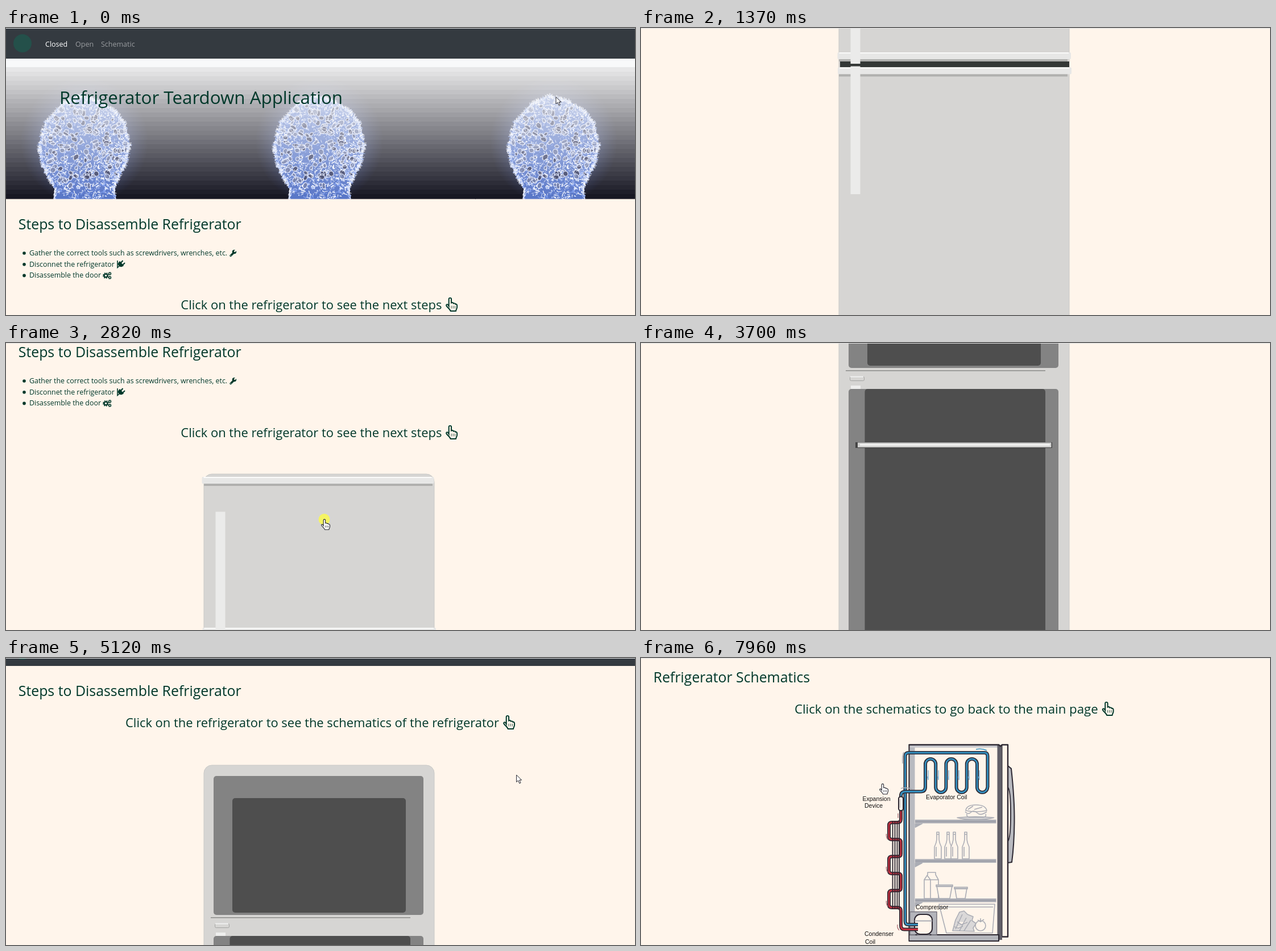
These frames come from a looping animation (1106 by 506 pixels, 8 s). An HTML page with a canvas:

```html
<!DOCTYPE html>
<html lang="en">
<head>
<meta charset="utf-8">
<title>Refrigerator Teardown</title>
<style>
html, body { margin: 0; width: 100%; height: 100%; overflow: hidden; background: #fff5eb; }
canvas { display: block; width: 1106px; height: 506px; }
</style>
</head>
<body>
<canvas id="stage" width="1106" height="506"></canvas>
<script>
const W = 1106, H = 506, LOOP = 8000;
const NAV_END = 54, HERO_END = 301.5;
const CREAM = '#fff5eb', GREEN = '#00382a', STEEL = '#d6d5d3', INK = '#2d2832', GREY = '#abadb5';
const SANS = '"Open Sans", "Noto Sans", sans-serif';
const ARIAL = '"Liberation Sans", sans-serif';
const ctx = document.getElementById('stage').getContext('2d');

// ---------- helpers ----------
function rect(x1, y1, x2, y2, color) {
  ctx.fillStyle = color;
  ctx.fillRect(x1, y1, x2 - x1, y2 - y1);
}
function round(x1, y1, x2, y2, r, fill, line, width = 1) {
  ctx.beginPath();
  ctx.roundRect(x1, y1, x2 - x1, y2 - y1, r);
  if (fill) { ctx.fillStyle = fill; ctx.fill(); }
  if (line) { ctx.strokeStyle = line; ctx.lineWidth = width; ctx.stroke(); }
}
function disc(x, y, r, color) {
  ctx.fillStyle = color;
  ctx.beginPath();
  ctx.arc(x, y, r, 0, 7);
  ctx.fill();
}
function text(str, x, y, size, color = GREEN, family = SANS) {
  ctx.font = `${size}px ${family}`;
  ctx.fillStyle = color;
  ctx.fillText(str, x, y);
}
function line(d, color, width, fill) {
  const p = new Path2D(d);
  if (fill) { ctx.fillStyle = fill; ctx.fill(p); }
  ctx.strokeStyle = color;
  ctx.lineWidth = width;
  ctx.stroke(p);
}
function pipe(d, color) {
  line(d, INK, 6);
  line(d, color, 2.8);
}
function at(x, y, scale, draw) {
  ctx.save();
  ctx.translate(x, y);
  ctx.scale(scale, scale);
  draw();
  ctx.restore();
}
// Linear track of [time, ...values]
function track(keys, t) {
  if (t <= keys[0][0]) return keys[0].slice(1);
  for (let i = 1; i < keys.length; i++) {
    const a = keys[i - 1], b = keys[i];
    if (t < b[0]) {
      const u = (t - a[0]) / (b[0] - a[0]);
      return a.slice(1).map((v, k) => v + (b[k + 1] - v) * u);
    }
  }
  return keys[keys.length - 1].slice(1);
}
function seeded(s) {
  return () => {
    s = (s + 0x6d2b79f5) | 0;
    let r = Math.imul(s ^ (s >>> 15), 1 | s);
    r = (r + Math.imul(r ^ (r >>> 7), 61 | r)) ^ r;
    return ((r ^ (r >>> 14)) >>> 0) / 4294967296;
  };
}

// ---------- timing ----------
const PAGES = [
  { from: 0, draw: closedPage, scroll: [[420, 0], [670, 134], [740, 134], [820, 160], [910, 160],
    [1370, 789], [1450, 789], [1510, 830], [1740, 830], [2490, 330]] },
  { from: 2870, draw: openPage, scroll: [[3300, 0], [3800, 560], [3940, 560], [4520, 162],
    [4620, 162], [4690, 150], [4780, 150], [5100, 40]] },
  { from: 5640, draw: schematicPage, scroll: [[5870, 0], [6230, 10], [6310, 10], [6600, 64]] }
];
const POINTER = [
  [70, 967, 121], [500, 1125, 160], [1740, 1125, 300], [1850, 1077, 290], [2490, 1077, 150],
  [2570, 1077, 150], [2790, 560, 311], [3010, 560, 311], [3350, 1125, 300], [3940, 1125, 300],
  [4040, 1082, 300], [4520, 1076, 190], [4620, 1076, 190], [4690, 1076, 172], [5000, 1076, 150],
  [5350, 560, 311], [5870, 560, 311], [6150, 1125, 260], [6350, 1125, 260], [6600, 600, 286],
  [6700, 600, 286], [6800, 609, 240], [6920, 570, 187], [7040, 500, 190], [7150, 482, 225],
  [7300, 528, 249], [7460, 528, 249], [7960, 425, 222]
];
const PRESSES = [[1850, 2490], [2780, 2870], [4040, 4690], [5400, 5490]];

// ---------- icons ----------
const HAND = 'M-2 12.5V1.8a1.9 1.9 0 0 1 3.8 0V7.4c1.6-.8 3-.2 3.3 1 1.5-.6 2.8 0 3 1.1 1.5-.3 2.4.5 2.4 2V14' +
  'c0 2.5-1.5 3.5-1.8 6H.6C0 17.5-3 15.5-5.6 12.2-6.8 10.4-4.6 8.8-3 10.8z';
const HAND_FOLDS = 'M1.8 12v4M4.6 12v4M7.3 12v4';

function handIcon(x, y) {
  at(x, y, 1.15, () => {
    line(HAND, GREEN, 1.7);
    line(HAND_FOLDS, GREEN, 0.7);
  });
}
function wrench(x, y) {
  at(x, y, 1, () => {
    ctx.lineCap = 'round';
    line('M-4 4.5L2-1.5', GREEN, 3.4);
    disc(2.4, -2.4, 3.7, GREEN);
    ctx.lineCap = 'butt';
    line('M2.5-2.5L6.5-6.5', CREAM, 2.6);
    disc(-3.8, 4.3, 0.7, CREAM);
  });
}
function plug(x, y) {
  at(x, y, 1, () => {
    line('M-6-6V6.5L-1 2', GREEN, 1.6);
    line('M-2-4L4 3Q0 6-3 3T-2-4z', GREEN, 1.5, GREEN);
    line('M0-2L3.5-6M3.5 1.5L7-2', GREEN, 2);
  });
}
function gear(x, y, r) {
  ctx.setLineDash([r * 0.42, r * 0.37]);
  line(`M${x - r} ${y}a${r} ${r} 0 1 0 ${2 * r} 0a${r} ${r} 0 1 0 ${-2 * r} 0`, GREEN, r * 0.5);
  ctx.setLineDash([]);
  disc(x, y, r * 0.9, GREEN);
  disc(x, y, r * 0.42, CREAM);
}

// ---------- banner ----------
const banner = makeBanner();

function makeBanner() {
  const tile = document.createElement('canvas');
  tile.width = 413;
  tile.height = 310;
  const g = tile.getContext('2d'), rnd = seeded(11);
  const tones = ['#fff', '#dbe5ff', '#7d9df0', '#f4f7ff'];
  const outline = [[131, 118], [162, 127], [193, 146], [209, 167], [218, 206], [212, 238], [198, 264],
    [190, 285], [194, 312], [84, 312], [86, 285], [73, 262], [61, 236], [57, 207], [69, 166], [99, 132]];
  const blob = new Path2D();
  outline.forEach(p => blob.lineTo(...p));
  blob.closePath();

  g.fillStyle = '#12121f';
  g.fillRect(0, 0, 413, 310);
  const glow = g.createRadialGradient(138, 200, 70, 138, 200, 112);
  glow.addColorStop(0, 'rgba(100,125,205,.4)');
  glow.addColorStop(1, 'rgba(60,80,150,0)');
  g.fillStyle = glow;
  g.fillRect(0, 70, 280, 240);

  function hair(x, y, angle, len, color, width) {
    g.strokeStyle = color;
    g.lineWidth = width;
    g.beginPath();
    g.moveTo(x, y);
    g.lineTo(x + Math.cos(angle) * len, y + Math.sin(angle) * len);
    g.stroke();
  }

  g.save();
  g.clip(blob);
  g.fillStyle = '#5674c6';
  g.fillRect(0, 100, 300, 210);
  for (let i = 0; i < 1500; i++) {
    const a = rnd() * 7, r = Math.pow(rnd(), 0.4) * 84;
    hair(138 + Math.cos(a) * r, 210 + Math.sin(a) * r * 1.15, rnd() * 7, 2 + rnd() * 4,
      tones[i % 4], 0.7 + rnd());
  }
  // dark cells in a bright net
  for (let i = 0; i < 150; i++) {
    const a = rnd() * 7, r = Math.sqrt(rnd()) * 74;
    g.fillStyle = rnd() < 0.5 ? '#32385f' : '#63709f';
    g.strokeStyle = '#dfe7ff';
    g.lineWidth = 1.1;
    g.beginPath();
    g.ellipse(138 + Math.cos(a) * r, 208 + Math.sin(a) * r * 1.05, 2 + rnd() * 4, 2 + rnd() * 3, a, 0, 7);
    g.fill();
    g.stroke();
  }
  for (let i = 0; i < 900; i++) {
    const a = rnd() * 7, r = Math.pow(rnd(), 0.35) * 86;
    hair(138 + Math.cos(a) * r, 210 + Math.sin(a) * r * 1.1, rnd() * 7, 2 + rnd() * 3, tones[i % 4], 0.8);
  }
  g.restore();

  outline.forEach((p, i) => {
    const q = outline[(i + 1) % outline.length];
    for (let k = 0; k < 40; k++) {
      const u = rnd(), x = p[0] + (q[0] - p[0]) * u, y = p[1] + (q[1] - p[1]) * u;
      const a = Math.atan2(y - 210, x - 138) + (rnd() - 0.5) * 1.6;
      hair(x - Math.cos(a) * 5, y - Math.sin(a) * 5, a, 4 + rnd() * 5, tones[k % 4], 0.9);
    }
  });
  return tile;
}

function hero(scroll) {
  ctx.save();
  ctx.beginPath();
  ctx.rect(0, NAV_END, W, HERO_END - NAV_END);
  ctx.clip();
  // The picture stays fixed in the window; the fade scrolls with the page.
  for (let i = 0; i < 3; i++) ctx.drawImage(banner, Math.round(i * 412.5), scroll);
  rect(0, NAV_END, W, 69, '#f8f9fa');
  for (let y = 69; y < HERO_END; y += 8) {
    const a = Math.max(0, (HERO_END - y - 4) / 248);
    rect(0, y, W, y + 8, `rgba(250,250,250,${a})`);
  }
  ctx.restore();
  text('Refrigerator Teardown Application', 94, 134, 31.3);
}

// ---------- pages ----------
function nav(active) {
  rect(0, 0, W, NAV_END, '#343a40');
  disc(29, 27, 16, '#24504a');
  ['Closed', 'Open', 'Schematic'].forEach((name, i) =>
    text(name, [69, 122, 167][i], 33, 12.5, i === active ? '#fff' : '#999c9f'));
}
function fridgeBody(top, bottom) {
  round(348, top, 753, bottom, 14, STEEL, '#c9c9c7');
}

function closedPage(scroll, t) {
  nav(0);
  hero(scroll);
  text('Steps to Disassemble Refrigerator', 21.8, 355, 24.85);
  ['Gather the correct tools such as screwdrivers, wrenches, etc.', 'Disconnet the refrigerator',
    'Disassemble the door'].forEach((step, i) => {
    disc(32, 397 + i * 19.7, 2.8, GREEN);
    text(step, 41, 401 + i * 19.7, 12.4);
  });
  wrench(399, 397);
  plug(202, 416);
  gear(175.5, 436.5, 4.3);
  gear(182.5, 433, 2.5);
  gear(182.5, 440, 2.5);
  text('Click on the refrigerator to see the next steps', 307.3, 496, 21.95);
  handIcon(781, 476);

  const early = t < 900, trim = early ? CREAM : '#e7e7e6';
  const grip = early ? CREAM : '#ebebea';
  fridgeBody(561, 1400);
  const strip = (x1, x2, y) => {
    round(x1, y, x2, y + 12, 2, trim);
    rect(x1 + 3, y, x2 - 4, y + 2, early ? CREAM : '#fbfbfa');
    rect(348, y + 12, 750, y + 16, '#b0b0ae');
  };
  strip(early ? 347 : 344.5, 752.5, 566);
  strip(345.5, 756, 832);
  rect(350, 848, 753, 858, '#343836');
  strip(346, 757, 858.5);
  rect(368.5, 627.5, 385.5, 852, grip);
  rect(368.5, 856.5, 385.5, 1082, grip);
}

function openPage() {
  nav(1);
  text('Steps to Disassemble Refrigerator', 21.8, 107, 24.85);
  text('Click on the refrigerator to see the schematics of the refrigerator', 210, 162, 21.95);
  handIcon(882, 142);
  ctx.translate(0, 162);
  fridgeBody(67, 900);
  round(365, 86, 734, 331, 5, '#838383');
  round(398, 125, 703, 327, 5, '#4e4e4e');
  rect(360, 335, 711, 336.5, '#8b8b89');
  round(367.5, 346.5, 392.5, 353.5, 2, STEEL, '#a3a3a1');
  rect(368, 345.5, 391, 347.5, '#f0f0ef');
  rect(369, 362, 386, 368, '#eeeeed');
  round(365, 368, 734, 860, 5, '#838383');
  round(393.5, 368, 711, 860, 5, '#4e4e4e');
  rect(377, 462, 723, 472, '#444');
  rect(381, 462.5, 721.5, 471, '#d2d2d1');
  rect(385, 465, 719, 468, '#f3f3f2');
}

function schematicPage() {
  nav(2);
  text('Refrigerator Schematics', 21.8, 107, 24.8);
  text('Click on the schematics to go back to the main page', 270, 162, 22.2);
  handIcon(818.5, 142);
  ctx.translate(0, 64);
  ctx.lineJoin = 'round';
  cabinet();
  groceries();
  plumbing();
  const label = (s, x, y) => text(s, x, y, 10.5, '#111', ARIAL);
  label('Expansion', 389.5, 252);
  label('Device', 393, 263.5);
  label('Evaporator Coil', 501, 249);
  label('Compressor', 483, 442.5);
  label('Condenser', 393, 489.5);
  label('Coil', 394, 503.5);
}

function cabinet() {
  rect(473, 155, 481.5, 488, '#b9bac0');
  rect(473, 154, 627, 158, '#c9c9ce');
  line('M645 190L651 195Q657 250 656.5 290T652 360L645 361', INK, 2, '#b9bac0');
  line('M645 228Q650 232 650 275T645 323', INK, 1.8, CREAM);
  rect(626.5, 154, 635, 497, '#615f68');
  line('M471.5 153H629L632 155.5L635 153H645V491.5H635', INK, 2.4);
  line('M471.5 152V499H629V488H471.5', INK, 2.2);
  rect(472.5, 489, 628, 498, '#b4b5bb');
  line('M635 154V491M629 488V499', INK, 1);
  for (const y of [285, 354.5, 424]) {
    rect(482, y, 624.5, y + 6.5, GREY);
    line(`M482 ${y + 3.5}H624`, '#8d8f98', 0.8);
    line(`M482 ${y + 7}H495L482 ${y + 14}z`, GREY, 1, GREY);
  }
}

function groceries() {
  const thin = (d, fill) => line(d, GREY, 1.6, fill);
  thin('M556 281.5Q588 278 620.5 281.5Q610 285 588 285T556 281.5z', '#d4d3d4');
  thin('M571 269Q572 259 589 259T608 269Q590 273 571 269z');
  thin('M570 271Q575 277 580 272T591 273T608 271M573 275Q572 280 577 281H602Q608 280 606 275M575 267L584 261M586 267L600 263');
  for (const x of [522, 540, 551, 571]) {
    thin(`M${x - 2} 307H${x + 2}V320Q${x + 2.5} 326 ${x + 6} 333V354H${x - 6}V333Q${x - 2.5} 326 ${x - 2} 320z`, CREAM);
    thin(`M${x - 2} 311H${x + 2}M${x - 3} 333V350`);
  }
  thin('M498 424V391L504 382V378H518V382L523 391V424zM498 391H523M503 383L509 391V424', CREAM);
  thin('M520 402H547L543 424H524zM519 400H548V403H519z', CREAM);
  thin('M552 406H573L570 424H555zM551 404H574V407H551z', CREAM);
  thin('M524 434H622L618 485H537zM528 439H619');
  thin('M548 481L553 462L560 448L568 446L574 452L584 456L582 463L589 468L584 476L586 482zM553 478L565 452M560 481L572 458M568 481L580 462M556 465L563 470L574 466M551 474L558 476L566 473', '#dad8d8');
  thin('M588 472a9 9 0 1 0 18 0a9 9 0 1 0-18 0M592 462L597 465L603 461M597 465V459', CREAM);
}

function plumbing() {
  const BLUE = '#3490c0', RED = '#c22f3f';
  // compressor
  line('M473 447.5H520V488H473z', '#77757f', 1.5, '#b4b5bb');
  round(481, 452, 512, 487, 10, CREAM, INK, 2);
  line('M481 463.5H512', GREY, 2);
  line('M484 487V489M509 487V489', INK, 3);

  // evaporator
  pipe('M487 470H470Q464.5 470 464.5 464V173Q464.5 167 471 167H604Q609.5 167 609.5 173V228', BLUE);
  let coil = 'M457 246V243Q457 235.5 465 235.5H492Q500 235.5 500 227V187';
  for (let i = 1; i <= 6; i++) {
    const x = 500 + i * 18.2, over = i % 2;
    coil += `A9.1 9 0 0 ${over} ${x} ${over ? 187 : 228}`;
    if (i < 6) coil += `V${over ? 228 : 187}`;
  }
  pipe(coil, BLUE);
  for (let i = 0; i < 6; i++) {
    const x = 505 + i * 18;
    line(`M${x} 198V215M${x - 1.5} 209L${x} 215`, '#7fb3d6', 1.4);
  }
  line('M589 161Q600 159 608 163', BLUE, 1.5);
  line('M462 166Q459 172 460 186M457 230Q465 227 477 231', GREY, 1.6);

  // condenser
  let zig = 'M457 268V284Q457 290 451 290H441';
  for (let i = 0; i < 5; i++) {
    const y = 290 + i * 30, side = i % 2 ? 457 : 436;
    zig += `Q${side} ${y} ${side} ${y + 5}V${y + 25}Q${side} ${y + 30} ${i % 2 ? 452 : 441} ${y + 30}`;
    if (i < 4) zig += `H${i % 2 ? 441 : 452}`;
  }
  pipe(zig + 'H451Q457 440 457 446V472Q457 478.5 463 478.5H487', RED);
  for (const x of [442.5, 446.5, 450.5, 454]) line(`M${x} 287V443`, INK, 1.8);
  for (const y of [310, 368, 428]) line(`M431.5 ${y}Q431 ${y + 6} 434 ${y + 10}`, '#a86a72', 1.4);
  line('M452 274V282M451 470Q450 476 454 480', '#a86a72', 1.3);
  round(453, 244.5, 461, 269, 3.5, CREAM, INK, 2);
  line('M455.5 249V264', GREY, 1);
}

// ---------- pointer ----------
function pointer(t) {
  const [x, y] = track(POINTER, t);
  if (PRESSES.some(([a, b]) => t >= a && t < b)) disc(x - 0.5, y, 10, 'rgba(255,255,60,.74)');
  if (x > 345 && x < 760) {
    at(x, y, 0.9, () => {
      line(HAND, '#22222c', 1.2, '#fff');
      line(HAND_FOLDS, '#22222c', 0.8);
    });
  } else {
    at(x, y, 1, () => line('M0 .5V13L3 10.3L5.2 15.4L7.4 14.4L5.2 9.5H9z', '#22222c', 1, '#fff'));
  }
}

function frame(now) {
  const t = now % LOOP;
  const page = PAGES.filter(p => t >= p.from).pop();
  const scroll = Math.round(track(page.scroll, t)[0]);
  rect(0, 0, W, H, CREAM);
  ctx.save();
  ctx.translate(0, -scroll);
  page.draw(scroll, t);
  ctx.restore();
  pointer(t);
  rect(0, 0, W, 1, '#e2e2e2');
  requestAnimationFrame(frame);
}
requestAnimationFrame(frame);
</script>
</body>
</html>
```
